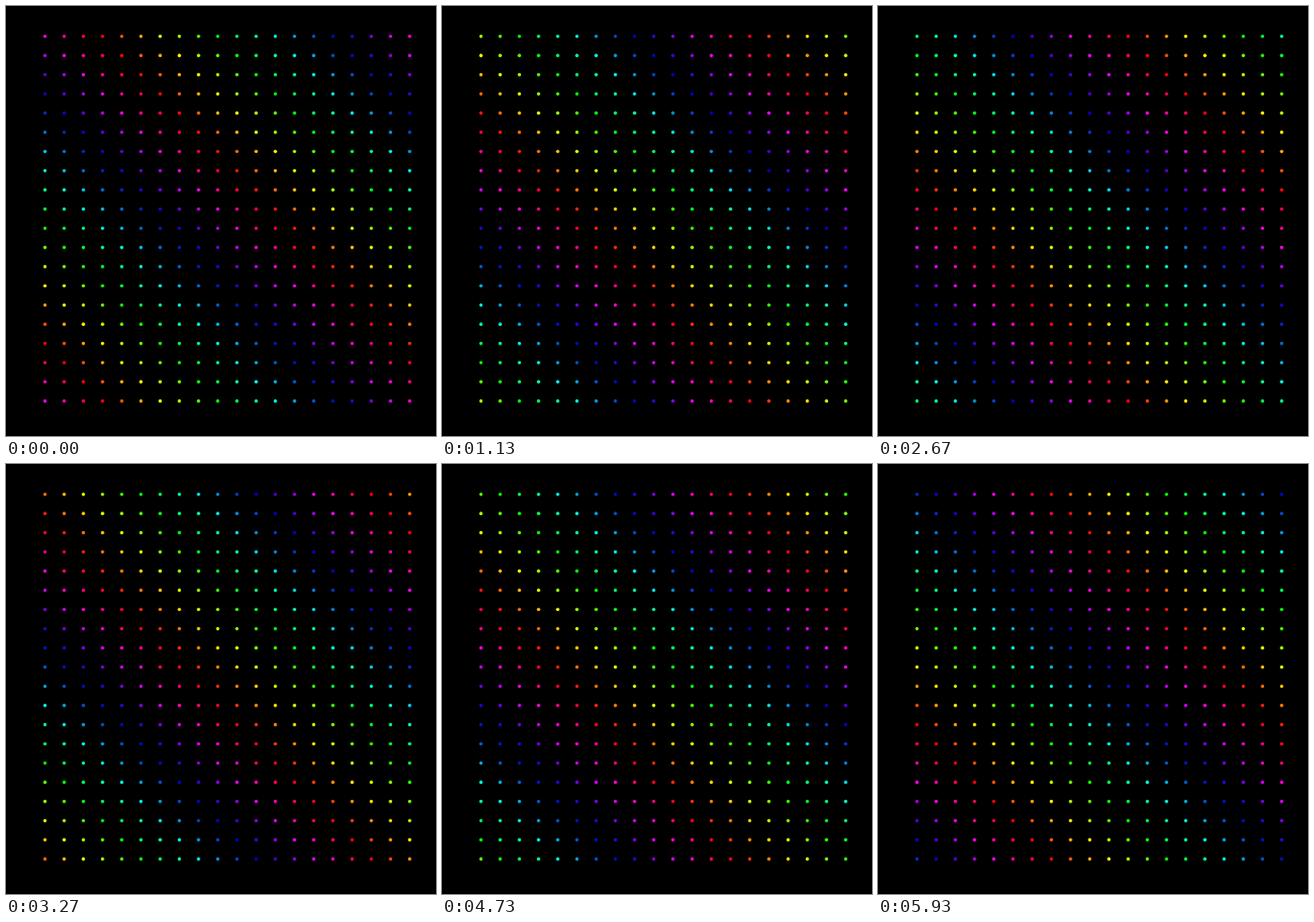
Animation, 480 px wide and 480 px high, one loop 5.99 s. Source, as an HTML page with a canvas:

```html
<!DOCTYPE html>
<html lang="en">
<head>
<meta charset="utf-8">
<title>Rainbow dots</title>
<style>
  html, body { margin: 0; width: 100%; height: 100%; overflow: hidden; background: #000; }
  canvas { display: block; width: 480px; height: 480px; }
</style>
</head>
<body>
<canvas id="stage" width="480" height="480"></canvas>
<script>
const ctx = document.getElementById('stage').getContext('2d');

const LOOP = 5990;
const FPS = 15;
const COUNT = 20;
const PITCH = 150 / 7;
const LEFT = 43.5, TOP = 33.8, RADIUS = 1.9;

// Hue in degrees: start value and change per column, row and step
const HUE = { start: 303, col: 19.5, row: -19, step: -13 };

const wrap = deg => ((deg % 360) + 360) % 360;

function colour(deg) {
  const hue = wrap(deg);
  // blues and violets are a little darker
  const dim = Math.max(0, 1 - Math.abs(hue - 235) / 70);
  return `hsl(${hue}, 100%, ${50 - 13 * dim}%)`;
}

// Steps start on a 10 ms clock
function stepAt(ms) {
  const tick = Math.floor((ms % LOOP) / 10) * 10;
  return Math.floor((tick + 5) * FPS / 1000);
}

function draw(step) {
  ctx.fillStyle = '#000';
  ctx.fillRect(0, 0, 480, 480);
  for (let row = 0; row < COUNT; row++) {
    for (let col = 0; col < COUNT; col++) {
      ctx.fillStyle = colour(HUE.start + HUE.col * col + HUE.row * row + HUE.step * step);
      ctx.beginPath();
      ctx.arc(LEFT + col * PITCH, TOP + row * PITCH, RADIUS, 0, Math.PI * 2);
      ctx.fill();
    }
  }
}

const begin = performance.now();

function tick() {
  draw(stepAt(performance.now() - begin));
  requestAnimationFrame(tick);
}

tick();
</script>
</body>
</html>
```
